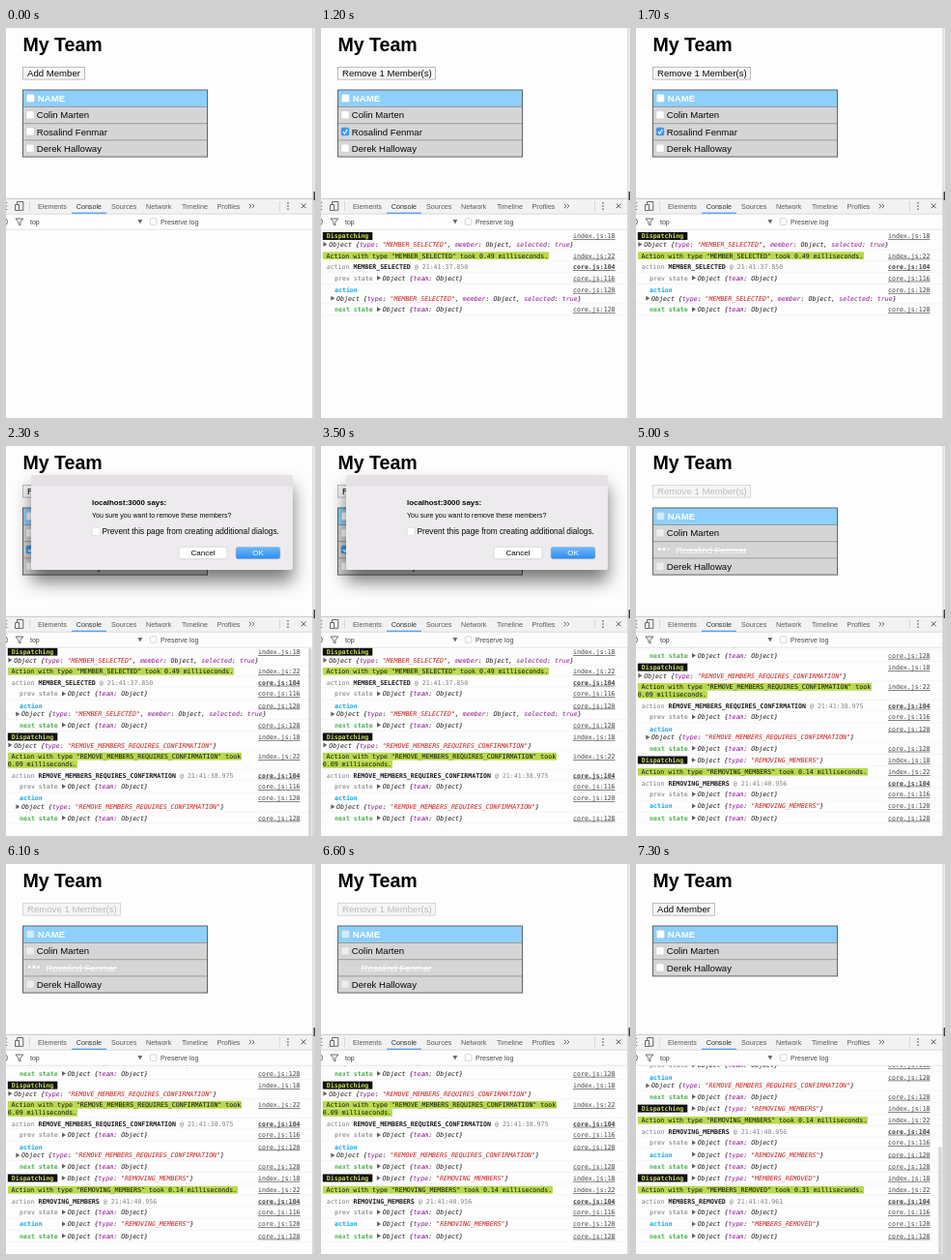
An HTML page for the animation above (7400 ms loop, 320x403 px).

```html
<!DOCTYPE html>
<html lang="en">
<head>
<meta charset="utf-8">
<title>My Team</title>
<style>
html, body { margin: 0; width: 100%; height: 100%; overflow: hidden; background: #fefdfe; }
svg { display: block; width: 320px; height: 403px; }
text { font-family: "Liberation Sans", Arial, sans-serif; white-space: pre; }
.mono text { font: 6.58px "DejaVu Sans Mono", Menlo, monospace; }
.b, .mono .b { font-weight: bold; }
.mono .i { font-style: italic; }
.mono .link { text-decoration: underline; }
.dialog { filter: drop-shadow(0 12px 9px rgba(0, 0, 0, .52)); }
</style>
</head>
<body>
<svg viewBox="0 0 320 403">
  <defs>
    <clipPath id="pane"><rect y="208.5" width="317" height="195"/></clipPath>
    <linearGradient id="blue" x2="0" y2="1">
      <stop stop-color="#72b9f9"/><stop offset="1" stop-color="#2a8cf4"/>
    </linearGradient>
  </defs>
  <rect width="320" height="403" fill="#fefdfe"/>
  <g id="page"></g>
  <g id="dots" fill="#fff"></g>
  <g id="dialog" class="dialog"></g>
  <g id="tools"></g>
  <g id="log" class="mono" clip-path="url(#pane)"></g>
  <rect id="thumb" x="313.2" width="3.4" rx="1.5" fill="#c2c2c2"/>
  <g id="edge"></g>
</svg>
<script>
const LOOP = 7400, SELECT = 700, ASK = 1800, REMOVING = 3800, REMOVED = 6800;
const CHAR = 6.58 * 0.602, WRAP = 8, LEFT = 1.8;
const MEMBERS = ['Colin Marten', 'Rosalind Fenmar', 'Derek Halloway'];
const ACTIONS = [
  { at: SELECT, type: 'MEMBER_SELECTED', ms: '0.49', time: '21:41:37.850', extra: true },
  { at: ASK, type: 'REMOVE_MEMBERS_REQUIRES_CONFIRMATION', ms: '0.09', time: '21:41:38.975' },
  { at: REMOVING, type: 'REMOVING_MEMBERS', ms: '0.14', time: '21:41:40.956' },
  { at: REMOVED, type: 'MEMBERS_REMOVED', ms: '0.31', time: '21:41:43.961' }
];
const el = id => document.getElementById(id);

const rect = (x, y, w, h, fill, more = '') =>
  `<rect x="${x}" y="${y}" width="${w}" height="${h}" fill="${fill}" ${more}/>`;
const path = (d, stroke, width = 1, fill = 'none') =>
  `<path d="${d}" stroke="${stroke}" stroke-width="${width}" fill="${fill}"/>`;
const label = (x, y, size, str, fill = '#080808', more = '') =>
  `<text x="${x}" y="${y}" font-size="${size}" fill="${fill}" ${more}>${str}</text>`;
const code = (x, y, str, fill = '#181818', cls = '') =>
  `<text x="${x}" y="${y + 2.4}" fill="${fill}" class="${cls}">${str}</text>`;
const span = (str, fill) => `<tspan fill="${fill}">${str}</tspan>`;
const arrow = (x, y) => path(`M${x} ${y - 2.5}l4 2.5l-4 2.5z`, 'none', 0, '#606060');

function checkbox(x, y, checked, disabled) {
  if (checked) {
    return rect(x, y, 8.4, 8.4, '#3f97f5', 'rx="1.7"') +
      path(`M${x + 2} ${y + 4.4}l1.8 2l2.7 -4.4`, '#fff', 1.2);
  }
  return rect(x + .2, y + .2, 8, 8, '#fff',
    `rx="1.5" stroke="#c8c8c8" stroke-width=".4" opacity="${disabled ? .6 : 1}"`);
}

function drawPage(count) {
  const busy = count === 3, selected = count === 1 || count === 2;
  const caption = selected || busy ? 'Remove 1 Member(s)' : 'Add Member';
  const rows = count === 4 ? [MEMBERS[0], MEMBERS[2]] : MEMBERS;
  const bottom = 81.5 + rows.length * 17.2;
  let out = label(17.4, 23.6, 19.6, 'My Team', '#000', 'class="b"');
  out += rect(17.5, 40.5, selected || busy ? 101 : 64, 12.6, busy ? '#f6f5f6' : '#f7f7f7',
    `stroke="${busy ? '#d0d0d0' : '#adadad'}" stroke-width=".8"`);
  out += label(22, 50, 9.6, caption, busy ? '#bcbcbc' : '#080808');
  out += rect(17.5, 64, 191, 17.5, '#8ed0fb');
  out += checkbox(21.2, 68.4, false, busy) + label(32.8, 76, 9.6, 'NAME', '#fff', 'class="b"');
  rows.forEach((name, i) => {
    const y = 81.5 + i * 17.2, leaving = busy && i === 1;
    out += rect(17.5, y, 191, 17.2, '#d6d5d6') + path(`M17.5 ${y}H208.5`, '#8a8a8a', .8);
    if (!leaving) out += checkbox(20.8, y + 4.1, selected && i === 1, busy);
    out += label(leaving ? 41.5 : 31.8, y + 11.8, 9.6, name, leaving ? '#fbfbfb' : '#080808',
      leaving ? 'text-decoration="line-through"' : '');
  });
  return out + rect(17.5, 64, 191, bottom - 64, 'none', 'stroke="#646464"');
}

function drawDialog() {
  const button = (x, w, fill, str, color) =>
    rect(x, 104.3, w, 12.4, fill, 'rx="2.5" stroke="#bdbdbd" stroke-width=".5"') +
    label(x + w / 2, 113.3, 8, str, color, 'text-anchor="middle"');
  return rect(26, 30, 271, 98, '#edebed', 'rx="2"') +
    rect(26, 30, 271, 12, '#e5e1e5', 'rx="2"') +
    label(89, 61, 7.9, 'localhost:3000 says:', '#080808', 'class="b"') +
    label(89, 74, 7, 'You sure you want to remove these members?') +
    checkbox(89, 84.2) +
    label(99.5, 91.3, 8.28, 'Prevent this page from creating additional dialogs.') +
    button(179, 50, '#fff', 'Cancel', '#080808') + button(238, 46, 'url(#blue)', 'OK', '#fff');
}

function drawTools() {
  const tabs = [['Elements', 33], ['Console', 72.7], ['Sources', 109], ['Network', 145],
    ['Timeline', 182], ['Profiles', 218.5]];
  let out = rect(0, 176, 317.5, 16, '#f3f2f3') + rect(0, 192, 317.5, 211, '#fefdfe');
  out += path('M0 176.3H317.5', '#bdbdbd', .8) + path('M0 192.2H317.5', '#cfcfcf', .7) +
    path('M0 208.2H317.5', '#dcdcdc', .7) + path('M24.5 179V189M283.5 179V189', '#cfcfcf', .7);
  out += path('M0 180.5H1.2M0 184H1.2M0 187.5H1.2', '#666', 1);
  out += path('M11.5 182V179.5H17.8V188.3H14M9.5 182.5h4v6h-4z', '#5a5a5a', .9);
  tabs.forEach(([name, x]) => {
    out += label(x, 186.6, 7.2, name, name === 'Console' ? '#333' : '#5a5a5a');
  });
  out += rect(68, 190.6, 36, 1.4, '#58a5ea');
  out += path('M251.7 181.8l2.2 2.2l-2.2 2.2M254.7 181.8l2.2 2.2l-2.2 2.2', '#5a5a5a', .9);
  [180.8, 184, 187.2].forEach(y => { out += rect(291.3, y - .7, 1.4, 1.4, '#5a5a5a'); });
  out += path('M305.8 181.4l4.8 4.8M310.6 181.4l-4.8 4.8', '#555', 1);
  out += path('M-2 196.8a3.5 3.5 0 0 1 0 7', '#666', 1);
  out += path('M10 197H17.8L14.9 200.6V204L12.9 202.8V200.6Z', '#5a5a5a', .9);
  out += label(25, 202.5, 7, 'top', '#444') + path('M136.5 198h4.8l-2.4 4.4z', 'none', 0, '#6a6a6a');
  out += rect(149.3, 196.8, 6.6, 6.6, '#fff', 'rx="1.2" stroke="#bbb" stroke-width=".6"');
  return out + label(160, 202.5, 7, 'Preserve log', '#444');
}

// Every entry is { h, draw(y) } with y at the centre of its first line.
function entries({ type, ms, time, extra }) {
  const link = (y, n, bold) => code(261, y, (n < 100 ? 'index.js:' : 'core.js:') + n, '#404040', bold ? 'link b' : 'link');
  const key = str => span(str, '#881391');
  const payload = `Object {${key('type')}: ${span(`"${type}"`, '#c41a16')}` +
    (extra ? `, ${key('member')}: Object, ${key('selected')}: ${span('true', '#8a1a90')}` : '') + '}';
  const wide = extra || type.length > 20, longType = type.length > 20;
  const object = (x, y, str) => arrow(x, y) + code(x + 5.8, y, str, '#181818', 'i');
  const took = `Action with type "${type}" took`, rest = `${ms} milliseconds.`;
  const lime = (x, y, str) => rect(LEFT, y - 3.9, x - LEFT + str.length * CHAR + .8, 7.8, '#b9da4e') +
    code(x, y, str, '#101010');
  const state = (y, name, color, n) => code(14, y, name, color, 'b') +
    object(58, y, `Object {${key('team')}: Object}`) + link(y, n);

  return [
    { h: 12.2 + (wide ? WRAP : 0), draw: y =>
      rect(LEFT, y - 4, 13 * CHAR, 8, '#101010') + code(LEFT + CHAR, y, 'Dispatching', '#c3df58', 'b') +
      (wide ? object(2.4, y + 8.6, payload) : object(57.8, y, payload)) + link(y, 18) },
    { h: 11.5 + (longType ? WRAP : 0), draw: y =>
      (longType ? lime(5.5, y, took) + lime(LEFT, y + 8.2, rest) : lime(5.5, y, `${took} ${rest}`)) + link(y, 22) },
    { h: 11.6, draw: y =>
      code(5.7, y, 'action', '#808080') + code(5.7 + 7 * CHAR, y, type, '#181818', 'b') +
      code(5.7 + (8 + type.length) * CHAR, y, '@ ' + time, '#808080') + link(y, 104, true) },
    { h: 12.2, draw: y => state(y, 'prev state', '#9e9e9e', 116) },
    { h: 12.2 + (wide ? WRAP : 0), draw: y =>
      code(14, y, 'action', '#12a7ee', 'b') +
      (wide ? object(10.3, y + 8.8, payload) : object(58, y, payload)) + link(y, 120) },
    { h: 12.2, draw: y => state(y, 'next state', '#4caf50', 128) }
  ];
}

function drawLog(count) {
  const list = ACTIONS.slice(0, count).flatMap(entries);
  const total = list.reduce((sum, e) => sum + e.h, 0);
  let y = Math.min(215, 396.4 - total), out = '';
  list.forEach(e => {
    out += path(`M0 ${y + e.h - 6}H317`, '#efeeef', .6) + e.draw(y);
    y += e.h;
  });
  const height = 194 * Math.min(1, 187 / (total || 187));
  el('thumb').setAttribute('y', 403 - height);
  el('thumb').setAttribute('height', height);
  return out;
}

el('tools').innerHTML = drawTools();
el('dialog').innerHTML = drawDialog();
el('edge').innerHTML = rect(317.5, 0, 2.5, 176, '#ececec') + rect(317.5, 176, 2.5, 227, '#d6d6d6') +
  path('M317.8 0V403', '#cfcfcf', .7) + rect(318.6, 169, 1.4, 9, '#3c3c3c');
el('dots').innerHTML = [24.2, 29, 33.4].map(x => `<circle cx="${x}" cy="106.6"/>`).join('');
const dots = [...el('dots').children];
let shown = -1;

function render(t) {
  const count = ACTIONS.filter(a => t >= a.at).length;
  if (count !== shown) {
    el('page').innerHTML = drawPage(count);
    el('log').innerHTML = drawLog(count);
    el('dialog').style.display = count === 2 ? '' : 'none';
    el('dots').style.display = count === 3 ? '' : 'none';
    shown = count;
  }
  // The overlay scrollbar fades out soon after each scroll.
  const idle = count > 1 ? t - ACTIONS[count - 1].at : LOOP;
  el('thumb').style.opacity = Math.max(0, Math.min(1, (600 - idle) / 150));
  dots.forEach((dot, i) => {
    const phase = (t / 1000 + 1.45 - .16 * i) % 1;
    const size = Math.max(0, 1 - Math.abs(phase - .4) / .4);
    dot.setAttribute('r', (1.75 * Math.sin(size * Math.PI / 2)).toFixed(2));
  });
}

const start = performance.now();
function tick() {
  render((performance.now() - start) % LOOP);
  requestAnimationFrame(tick);
}
tick();
</script>
</body>
</html>
```
